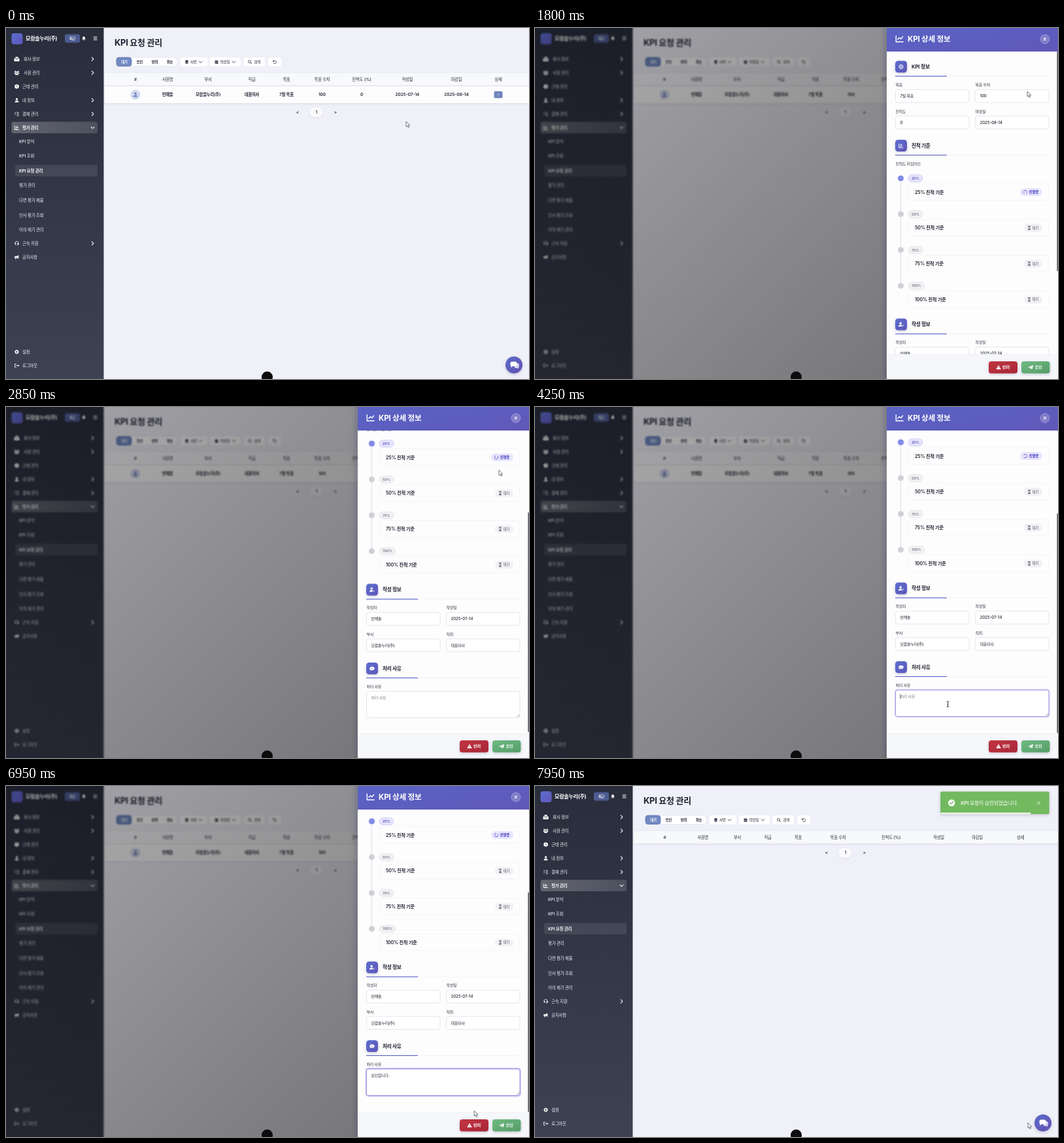
An HTML page that plays this animation: 800x537 px, repeating every 8 s.

```html
<!DOCTYPE html>
<html lang="ko">
<head>
<meta charset="utf-8">
<title>KPI 요청 관리</title>
<style>
html, body { margin: 0; width: 100%; height: 100%; overflow: hidden; background: #f0f0f8; }
svg { display: block; width: 100vw; height: 100vh; font-family: Inter, 'Noto Sans CJK KR', 'Noto Sans KR', sans-serif; }
text { white-space: pre; }
</style>
</head>
<body>
<svg id="stage" viewBox="0 0 800 537" preserveAspectRatio="none"></svg>
<script>
const LOOP = 8000;
const COMPANY = '모람솔누리(주)', PERSON = '빈해솔';
const DARK = '#1f2230', INDIGO = '#5b5fc4';

// ---------- markup helpers ----------
const rect = (x, y, w, h, fill, r = 0, extra = '') =>
  `<rect x="${x}" y="${y}" width="${w}" height="${h}" rx="${r}" fill="${fill}" ${extra}/>`;
const circle = (x, y, r, fill, extra = '') => `<circle cx="${x}" cy="${y}" r="${r}" fill="${fill}" ${extra}/>`;
const line = (d, color, w = 1, extra = '') =>
  `<path d="${d}" fill="none" stroke="${color}" stroke-width="${w}" stroke-linecap="round" stroke-linejoin="round" ${extra}/>`;

// y is the vertical middle of the text
function text(x, y, str, size = 6.5, weight = 500, fill = DARK, anchor = 'start', extra = '') {
  const hangul = (str.match(/[가-힣]/g) || []).length;
  const spacing = (-0.05 * hangul / Math.max(1, str.length)).toFixed(4);
  return `<text x="${x}" y="${(y + size * 0.36).toFixed(2)}" font-size="${size}" font-weight="${weight}" fill="${fill}"
    text-anchor="${anchor}" letter-spacing="${spacing}em" ${extra}>${str.replace(/</g, '&lt;')}</text>`;
}
const mid = (x, y, str, size, weight, fill) => text(x, y, str, size, weight, fill, 'middle');

// Icons live in a box from -4 to 4
const ICONS = {
  building: '<path d="M-4-1h2v-2.5h4v2.5h2v4.5h-8z"/><path d="M-1-2v4M1-2v4" stroke="#2b2f3f" stroke-width=".6"/>',
  users: '<circle cx="-2.4" cy="-1.8" r="1.1"/><circle cx="2.4" cy="-1.8" r="1.1"/><circle cy="-1" r="1.3"/><path d="M-4 1.4q.2-1.8 2-1.8l.8 1q-1 .4-1 1zM4 1.4q-.2-1.8-2-1.8l-.8 1q1 .4 1 1zM-2.6 3.2q0-2.4 2.6-2.4t2.6 2.4z"/>',
  clock: '<circle r="3.3"/><path d="M0-2v2.2l1.4.8" fill="none" stroke="#2b2f3f" stroke-width=".7"/>',
  user: '<circle cy="-1.6" r="1.7"/><path d="M-3 3.3q0-2.8 3-2.8t3 2.8z"/>',
  list: '<path d="M-3.4-2.4l.7.7 1.2-1.3M-3.4.1l.7.7 1.2-1.3M-3 2.6h.2M0-2.2h3.2M0 .2h3.2M0 2.6h3.2" fill="none" stroke="#fff" stroke-width=".9"/>',
  chart: '<path d="M-3.2-3v6h6.6M-1.4-1.8h2.6M-1.4 0h3.8M-1.4 1.6h1.4" fill="none" stroke="#fff" stroke-width="1"/>',
  headset: '<path d="M-2.8.6v-.8a2.8 2.8 0 0 1 5.6 0v1.2q0 1.6-2.4 1.7" fill="none" stroke="#fff" stroke-width=".8"/><rect x="-2.6" y="-.4" width="1.5" height="2.4" rx=".5"/><rect x="1.1" y="-.4" width="1.5" height="2.4" rx=".5"/>',
  horn: '<path d="M-3.4-1.2h2.6l3.6-1.8v5.6l-3.6-1.6h-.6l.6 2.2h-1.2l-.7-2.2h-.7z"/>',
  gear: '<circle r="2" fill="none" stroke="#fff" stroke-width="1.5"/><circle r="2.9" fill="none" stroke="#fff" stroke-width=".9" stroke-dasharray="1.3 1.737"/>',
  exit: '<path d="M-.8-2.4h-2.2v4.8h2.2M-1 0h4M1.6-1.6l1.6 1.6-1.6 1.6" fill="none" stroke="#fff" stroke-width=".9"/>',
  bell: '<path d="M-2.8 1.8q1-1 1-2.6 0-2 1.8-2.2 1.8.2 1.8 2.2 0 1.6 1 2.6zM-.9 2.3h1.8q-.3 1-.9 1t-.9-1z"/>',
  target: '<circle r="3.1" fill="none" stroke="#fff"/><circle r="1.3" fill="none" stroke="#fff" stroke-width=".9"/>',
  userEdit: '<circle cx="-.8" cy="-1.8" r="1.8"/><path d="M-4 3.2q0-2.7 3.2-2.7 1.5 0 2.2.5l-1.2 2.2zM1 3.2l2.4-2.6.7.7-2.4 2.2z"/>',
  bubble: '<path d="M0-2.8c2.3 0 3.8 1.2 3.8 2.7S2.3 2.6 0 2.6q-.7 0-1.3-.2-1 .8-2.2.8.7-.6.8-1.5-1.1-.7-1.1-1.8c0-1.5 1.5-2.7 3.8-2.7z"/><path d="M-1.6 0h.1M0 0h.1M1.6 0h.1" stroke="#6660c0" stroke-width=".8" stroke-linecap="round"/>',
  warn: '<path d="M0-3l3.5 6h-7z" stroke="#fff" stroke-width=".4" stroke-linejoin="round"/><path d="M0-1v2M0 1.9v.2" stroke="#b52d3b" stroke-width=".7"/>',
  plane: '<path d="M3.4-3.2l-1 6-2.2-.9-1.1 1.4-.2-2 3-3.2-4 2.9-2.2-.9z"/>',
  hourglass: '<path d="M-2.2-2.9h4.4M-2.2 2.9h4.4" stroke="#55586a" stroke-width=".9"/><path d="M-1.5-2.6h3q0 1.6-1 2.6 1 1 1 2.6h-3q0-1.6 1-2.6-1-1-1-2.6z" fill="none" stroke="#55586a" stroke-width=".8"/><path d="M-.9 2.3h1.8l-.9-1.5z" fill="#55586a"/>',
  badge: '<rect x="-2.2" y="-3" width="4.4" height="6" rx=".7"/><path d="M0-1.2v.1M-1 1.4h2" stroke="#fff" stroke-width="1"/>',
  date: '<rect x="-2.6" y="-2.6" width="5.2" height="5.6" rx=".6"/><path d="M-1.6 0h1.2M.4 0h1.2M-1.6 1.6h1.2" stroke="#fff" stroke-width=".9"/>',
  search: '<circle cx="-.5" cy="-.5" r="2" fill="none" stroke="#333748" stroke-width=".8"/><path d="M1 1l1.8 1.8" stroke="#333748" stroke-width=".9"/>',
  undo: '<path d="M-2.4-2.4v1.9h1.9M-2.2-.8a2.4 2.4 0 1 1 .4 2.6" fill="none" stroke="#333748" stroke-width=".8"/>'
};
const icon = (name, x, y, fill = '#fff', scale = 1) =>
  `<g transform="translate(${x} ${y}) scale(${scale})" fill="${fill}">${ICONS[name]}</g>`;
const chevron = (x, y, down, color, w = 1) =>
  line(down ? `M${x - 2.4} ${y - 1.2}l2.4 2.4 2.4-2.4` : `M${x - 1.2} ${y - 2.6}l2.6 2.6-2.6 2.6`, color, w);

// ---------- list page ----------
function sidebar() {
  let s = rect(-20, -20, 169.5, 577, 'url(#side)');
  s += rect(8.5, 8, 17, 17, 'url(#brand)', 4);
  s += text(30, 16, COMPANY, 8.1, 700, '#fff');
  s += rect(90, 9.5, 23, 13, '#4d5c92', 3) + mid(101.5, 16, '퇴근', 5.3, 600, '#fff');
  s += icon('bell', 119, 15.8);
  s += line('M134.2 13.7h4.8M134.2 15.9h4.8M134.2 18.1h4.8', '#fff', 0.9);
  s += rect(8.5, 143.5, 131.5, 17.5, 'url(#active)', 3);
  s += rect(14, 209.5, 126, 17.5, '#fff', 3, 'opacity=".09"');
  const items = [
    [47.5, 'building', '회사 정보', 27, 1], [68.5, 'users', '사원 관리', 27, 1], [89.5, 'clock', '근태 관리', 25],
    [110.5, 'user', '내 정보', 25, 1], [131.5, 'list', '결재 관리', 25, 1], [152.5, 'chart', '평가 관리', 25, 2],
    [329.5, 'headset', '근속 지원', 25, 1], [350.5, 'horn', '공지사항', 25], [495.5, 'gear', '설정', 25], [516.5, 'exit', '로그아웃', 25]
  ];
  for (const [y, ic, label, x, arrow] of items) {
    s += icon(ic, 16.5, y) + text(x, y, label, 6.5, arrow === 2 ? 700 : 500, '#f1f2f6');
    if (arrow) s += chevron(132.5, y, arrow === 2, '#f4f5f8', 1.1);
  }
  ['KPI 분석', 'KPI 조회', 'KPI 요청 관리', '평가 관리', '다면 평가 제출', '인사 평가 조회', '이의 제기 관리'].forEach((label, i) => {
    s += text(20, 173.5 + i * 22.55, label, 6.5, i === 2 ? 700 : 500, '#f1f2f6');
  });
  return s;
}

function header(cols) {
  const names = ['#', '사원명', '부서', '직급', '목표', '목표 수치', '진척도 (%)', '작성일', '마감일', '상세'];
  return names.map((n, i) => mid(cols[i], 78.5, n, 6.4, 500, '#2a2d3a')).join('');
}

function pager(y) {
  return mid(446, y, '<', 6.5, 600) + mid(504, y, '>', 6.5, 600) +
    rect(464.5, y - 7, 20, 15, '#fafafd', 7.5, 'filter="url(#soft)"') + mid(474.8, y, '1', 6.5, 500);
}

function listPage() {
  const full = [198, 247, 309, 376, 429, 483.5, 544, 614, 689, 753];
  const empty = [198.5, 256.5, 309.5, 356, 402.5, 463.5, 544.5, 617.5, 676.5, 742.5];
  const cells = ['', PERSON, COMPANY, '대표이사', '7월 목표', '100', '0', '2025-07-14', '2025-08-14', ''];
  let s = rect(149.5, -20, 680, 577, '#f0f0f8');
  s += text(166, 22.5, 'KPI 요청 관리', 13, 700);
  s += rect(168.5, 45, 93.5, 13.5, '#fff', 4, 'stroke="#dfe2ee" stroke-width=".7"');
  s += rect(169, 45, 23, 13.5, '#7189c2', 4, 'stroke="#5d76b3" stroke-width=".8"');
  ['대기', '승인', '반려', '취소'].forEach((t, i) => s += mid(181 + i * 23.2, 52, t, 5.4, 600, i ? DARK : '#fff'));
  for (const [x, w] of [[267, 41], [312, 47], [363.5, 32.5], [401, 20]]) s += rect(x, 45, w, 13.5, '#fff', 3);
  s += icon('badge', 276.5, 52, '#333748', 0.9) + text(282, 52, '사번', 5.6) + chevron(297.5, 52, true, '#333748', 0.9);
  s += icon('date', 322, 52, '#333748', 0.9) + text(327.5, 52, '작성일', 5.6) + chevron(348.5, 52, true, '#333748', 0.9);
  s += icon('search', 373, 52) + text(379.5, 52, '검색', 5.6) + icon('undo', 411, 52);
  s += rect(151, 69, 660, 19, '#f8f9fb', 0, 'filter="url(#soft)"');
  s += `<g id="full">${header(full)}${rect(151, 89, 660, 26, '#fdfdfe', 0, 'filter="url(#soft)"')}`;
  s += circle(198, 102, 7.5, '#d5d9ee') + icon('user', 198, 102, '#6d82c0', 1.05);
  s += cells.map((c, i) => c && mid(full[i], 102, c, 6.4, 600)).join('');
  s += rect(746.5, 96.8, 13, 10.4, '#6d84bd', 2) + chevron(753, 102, false, '#fff', 0.9).replace('<path', '<path transform="translate(226 30.6) scale(.7)"');
  s += pager(128.5) + '</g>';
  s += `<g id="empty">${header(empty)}${pager(102)}</g>`;
  s += circle(777, 515.5, 13, 'url(#chat)', 'filter="url(#drop)"') +
    '<g fill="#fff"><path opacity=".75" d="M778 513h5q1.8 0 1.8 2v3.2q0 1.4-1 1.8v1.6l-2-1.4h-3.800z"/><path d="M774 510.500h5q2.600 0 2.600 2.600v1.800q0 2.600-2.600 2.600h-4l-3 2 .4-2.800q-1-.8-1-2 0-4.200 2.600-4.200z"/></g>';
  return s;
}

// ---------- detail drawer ----------
function section(y, name, ic) {
  return rect(551, y - 9, 18, 18, 'url(#brand)', 4.5, 'filter="url(#drop)"') + icon(ic, 560, y) +
    text(576, y, name, 7.7, 700) + rect(551, y + 14.3, 235, 0.5, '#e7e8ef') + rect(551, y + 13.9, 79, 1.1, INDIGO);
}
function field(col, y, label, value) {
  const x = col ? 673.5 : 551.5;
  return text(x, y, label, 6, 500, '#30333f') +
    rect(x, y + 7, 112.5, 19.7, '#fff', 3, 'stroke="#dfe1e9" stroke-width=".8"') + text(x + 7, y + 16.9, value, 6, 500);
}
function milestone(i) {
  const y = 230 + i * 54.8, on = i === 0, pct = (i + 1) * 25 + '%', w = i === 3 ? 25 : 22;
  let s = rect(571, y + 8, 215, 25.5, 'none', 4, 'stroke="#f3f3f8" stroke-width=".8"');
  s += on ? circle(559.5, y, 5.4, '#d9d9fa', 'id="halo"') + circle(559.5, y, 4, '#7680e6') + circle(559.5, y, 1.9, '#8f97ee')
    : circle(559.5, y, 4.7, '#e4e4e9') + circle(559.5, y, 4, '#cfcfd4');
  s += rect(571, y - 5.5, w, 11, on ? '#e6e4fc' : '#f0f0f4', 5.5, `stroke="${on ? '#c4c0f4' : '#dddde4'}" stroke-width=".6"`);
  s += mid(571 + w / 2, y, pct, 5.3, 600, on ? '#5146c4' : '#70737f');
  s += text(581, y + 21, pct + ' 진척 기준', 7.1, 600);
  const px = on ? 742 : 748;
  s += rect(px, y + 15, 776 - px, 12, on ? '#e8e6fd' : '#f1f1f5', 6);
  s += on ? `<g transform="translate(750 ${y + 21})"><path id="spin" d="M1.2-2.3a2.6 2.6 0 1 1-2.4 0" fill="none" stroke="#4f46c8" stroke-width=".8"/></g>`
    : icon('hourglass', 756, y + 21, '#55586a', 0.9);
  return s + text(on ? 755.5 : 760.5, y + 21, on ? '진행중' : '대기', 5.6, on ? 600 : 500, on ? '#4339bd' : '#4d5060');
}
function drawer() {
  let s = rect(538, -20, 290, 577, '#fdfdfe', 0, 'filter="url(#side-shadow)"');
  s += '<g clip-path="url(#view)"><g id="scroll">';
  s += section(59.3, 'KPI 정보', 'target');
  s += field(0, 87.3, '목표', '7월 목표') + field(1, 87.3, '목표 수치', '100');
  s += field(0, 127.7, '진척도', '0') + field(1, 127.7, '마감일', '2025-08-14');
  s += section(180, '진척 기준', 'chart') + text(551.5, 208, '진척도 타임라인', 6, 500, '#30333f');
  s += rect(559, 230, 1, 164, '#dcdce4');
  for (let i = 0; i < 4; i++) s += milestone(i);
  s += section(453.5, '작성 정보', 'userEdit');
  s += field(0, 481.3, '작성자', PERSON) + field(1, 481.3, '작성일', '2025-07-14');
  s += field(0, 521.7, '부서', COMPANY) + field(1, 521.7, '직위', '대표이사');
  s += section(574, '처리 사유', 'bubble') + text(551.5, 602, '처리 사유', 6, 500, '#30333f');
  s += rect(550.5, 608, 236.5, 42.5, 'none', 4, 'id="ring" stroke="#c9c7f3" stroke-width="1.8"');
  s += rect(551.5, 609, 234.5, 40.5, '#fff', 3, 'id="area" stroke="#dfe1e9" stroke-width=".9"');
  s += line('M781.5 648l3.500-3.500M783.500 648l1.500-1.500', '#777', 0.6);
  s += text(558.5, 618.8, '처리 사유', 6, 400, '#7a7d88', 'start', 'id="hint"') + text(558.5, 618.8, '', 6, 500, DARK, 'start', 'id="typed"');
  s += rect(0, 622.2, 5, 0.5, DARK, 0, 'id="under"') + rect(0, 615.2, 0.6, 7.4, '#111', 0, 'id="caret"');
  s += '</g></g>';
  s += rect(798.4, 36, 1.6, 336, '#5c5d63', 0.8, 'id="thumb"');
  s += rect(538, -20, 290, 56, 'url(#head)');
  s += line('M552.3 12v9.300h10.800M554.800 17.600l2.600-2.800 2.200 2 3-3.600', '#fff', 1.4);
  s += text(570, 17, 'KPI 상세 정보', 11.7, 700, '#fff');
  s += circle(780, 17, 7, '#fff', 'fill-opacity=".2" stroke="#fff" stroke-opacity=".4" stroke-width=".7"') + line('M778.200 15.200l3.600 3.600M781.800 15.200l-3.600 3.600', '#fff', 1.1);
  s += rect(538, 499, 290, 50, '#f6f7fb') + rect(538, 499, 290, 0.5, '#e9eaf0');
  s += rect(694, 510, 44, 18.5, 'url(#red)', 4, 'filter="url(#drop)"') + icon('warn', 709, 519) + text(715, 519.2, '반려', 6.2, 700, '#fff');
  s += rect(744, 510, 43.5, 18.5, 'url(#green)', 4, 'filter="url(#drop)"') + icon('plane', 758.5, 519) + text(764.5, 519.2, '승인', 6.2, 700, '#fff');
  return s;
}

function toast() {
  return rect(620, 8.5, 166.5, 34.5, '#72b95f', 2, 'filter="url(#drop)"') + circle(637, 25.7, 5.2, '#fff') +
    line('M634.600 25.800l1.800 1.800 3.200-3.600', '#72b95f', 1.3) + text(651, 25.8, 'KPI 요청이 승인되었습니다.', 7.9, 500, '#fff') +
    line('M768 24l4.400 4.400M772.400 24l-4.400 4.400', '#b5dcab', 1.1) + rect(620, 40.6, 166.5, 2.4, '#eaf6e6', 0, 'id="bar"');
}

const grad = (id, a, b, dir = 'x2="1" y2="1"') =>
  `<linearGradient id="${id}" x1="0" y1="0" ${dir}><stop stop-color="${a}"/><stop offset="1" stop-color="${b}"/></linearGradient>`;
const shadow = (id, dx, dy, blur, op, box) =>
  `<filter id="${id}" ${box}><feDropShadow dx="${dx}" dy="${dy}" stdDeviation="${blur}" flood-color="#1c2048" flood-opacity="${op}"/></filter>`;
const wide = 'x="-50%" y="-50%" width="200%" height="200%"';

document.getElementById('stage').innerHTML = `<defs>
  ${grad('side', '#282c3b', '#3e4354', 'x2="0" y2="1"')}${grad('brand', '#5b6fd0', '#5f55b8')}${grad('active', '#62656f', '#4d515f', 'x2="1" y2="0"')}
  ${grad('chat', '#5a6cc8', '#6450b0')}${grad('head', '#5766c8', '#6157b8')}${grad('red', '#c23443', '#a72836')}${grad('green', '#6fba80', '#569c69')}
  <linearGradient id="dim" gradientUnits="userSpaceOnUse" x1="65.750" y1="-65.750" x2="734.250" y2="602.750">
    <stop stop-opacity=".31"/><stop offset="1" stop-opacity=".55"/></linearGradient>
  ${shadow('soft', 0, 1, 1.6, 0.1, wide)}${shadow('drop', 0, 1.5, 2, 0.2, wide)}
  ${shadow('side-shadow', -2, 0, 5, 0.25, 'x="-20%" y="-5%" width="140%" height="110%"')}
  <filter id="blur" filterUnits="userSpaceOnUse" x="-15" y="-15" width="830" height="567" color-interpolation-filters="sRGB">
    <feGaussianBlur id="haze" stdDeviation="0"/></filter>
  <clipPath id="view"><rect x="538" y="36" width="262" height="463"/></clipPath></defs>
  <g id="page">${listPage()}${sidebar()}</g>
  <rect id="veil" width="800" height="537" fill="url(#dim)"/>
  <g id="drawer">${drawer()}</g>
  <g id="toast">${toast()}</g>
  ${circle(399.5, 534, 8.5, '#0c0c0e')}
  <path id="arrow" d="M0 0v8l1.900-1.600 1.300 2.900 1.400-.6-1.300-2.800h2.500z" fill="#fff" stroke="#3c3d44" stroke-width=".7" stroke-linejoin="round"/>
  <path id="beam" d="M-1.800-4.200q1.800 0 1.800 1 0-1 1.800-1M0-3.200v6.400M-1.800 4.200q1.800 0 1.800-1 0 1 1.800 1M-.8.8h1.600" fill="none" stroke="#222" stroke-width=".9"/>`;

const el = {};
document.querySelectorAll('#stage [id]').forEach(n => el[n.id] = n);

// ---------- motion ----------
const clamp = v => Math.max(0, Math.min(1, v));
const span = (t, from, to) => clamp((t - from) / (to - from));
const smooth = p => p * p * (3 - 2 * p);
const easeOut = p => 1 - (1 - p) ** 3;
const set = (id, name, value) => el[id].setAttribute(name, value);
const show = (id, on) => set(id, 'display', on ? 'inline' : 'none');

// Cursor moves: start, end, x, y
const MOVES = [[0, 0, 612, 143], [100, 800, 753, 97], [1900, 2800, 754, 96.5], [3100, 4050, 631.5, 454.7], [4300, 4700, 631.5, 455.7], [6500, 7215, 754, 515.3]];
function cursorAt(t) {
  let [, , x, y] = MOVES[0];
  for (const [from, to, tx, ty] of MOVES.slice(1)) {
    const p = smooth(span(t, from, to));
    x += (tx - x) * p;
    y += (ty - y) * p;
  }
  return [x, y];
}

const KEYS = ['', 'ㅅ', '스', '승', '승ㅇ', '승이', '승인', '승인ㅎ', '승인하', '승인합', '승인합ㄴ', '승인합니', '승인합닏', '승인합니다', '승인합니다.'];
const TYPE_AT = 4800, KEY_MS = 120, FOCUS_AT = 4170;
const TOAST_AT = 7440, BOUNCE = [[0, 260], [0.6, -9.6], [0.75, 8.4], [0.9, 1.4], [1, 3.4]];

function toastShift(p) {
  let i = 1;
  while (i < BOUNCE.length - 1 && p > BOUNCE[i][0]) i++;
  const [a, x] = BOUNCE[i - 1], [b, y] = BOUNCE[i];
  const f = clamp((p - a) / (b - a));
  return x + (y - x) * (i === 1 ? easeOut(f) : f);
}

let lastTyped = '', typedWidth = 0;
function typing(t) {
  const n = Math.max(0, Math.min(KEYS.length - 1, Math.floor((t - TYPE_AT) / KEY_MS) + 1));
  const str = KEYS[n];
  if (str !== lastTyped) {
    el.typed.textContent = lastTyped = str;
    el.typed.setAttribute('letter-spacing', '-.04em');
    typedWidth = str ? el.typed.getComputedTextLength() : 0;
  }
  const focus = span(t, FOCUS_AT, FOCUS_AT + 160);
  const busy = n > 0 && n < KEYS.length - 1;
  show('hint', !n);
  show('under', busy);
  set('under', 'x', 558.5 + typedWidth - 5.3);
  set('caret', 'x', 558.5 + typedWidth);
  show('caret', focus > 0 && t < 7300 && (busy || (t - FOCUS_AT) % 1000 < 500));
  set('ring', 'opacity', focus);
  set('area', 'stroke', focus > 0.5 ? '#8b87d8' : focus > 0 ? '#b3b1e0' : '#dfe1e9');
}

function draw(t) {
  const open = easeOut(span(t, 950, 1300)) * (1 - smooth(span(t, 7380, 7680)));
  const veiled = open > 0.001;
  if (veiled) set('page', 'filter', 'url(#blur)'); else el.page.removeAttribute('filter');
  set('haze', 'stdDeviation', (1.25 * open).toFixed(3));
  set('veil', 'opacity', open);
  show('drawer', veiled);
  set('drawer', 'transform', `translate(${(1 - open) * 275} 0)`);
  show('full', t < 7480);
  show('empty', t >= 7480);

  const scroll = 176 * easeOut(span(t, 2100, 3070));
  set('scroll', 'transform', `translate(0 ${-scroll})`);
  set('thumb', 'y', 36 + scroll * 0.72);
  set('spin', 'transform', `rotate(${(t - 800) * 0.18})`);
  set('halo', 'r', 5.4 + 0.5 * Math.sin(t * Math.PI / 1000));
  typing(t);

  show('toast', t >= TOAST_AT);
  set('toast', 'transform', `translate(${toastShift(span(t, TOAST_AT, TOAST_AT + 750))} 0)`);
  set('toast', 'opacity', span(t, TOAST_AT, TOAST_AT + 300));
  set('bar', 'width', 166.5 * (1 - span(t, TOAST_AT, TOAST_AT + 3000)));

  const [x, y] = cursorAt(t);
  const inArea = open > 0.9 && x > 551 && x < 786 && y > 609 - scroll && y < 649.5 - scroll;
  show('arrow', !inArea);
  show('beam', inArea);
  set('arrow', 'transform', `translate(${x} ${y})`);
  set('beam', 'transform', `translate(${x} ${y})`);
}

const start = performance.now();
function tick() {
  draw((performance.now() - start) % LOOP);
  requestAnimationFrame(tick);
}
draw(0);
requestAnimationFrame(tick);
</script>
</body>
</html>
```
